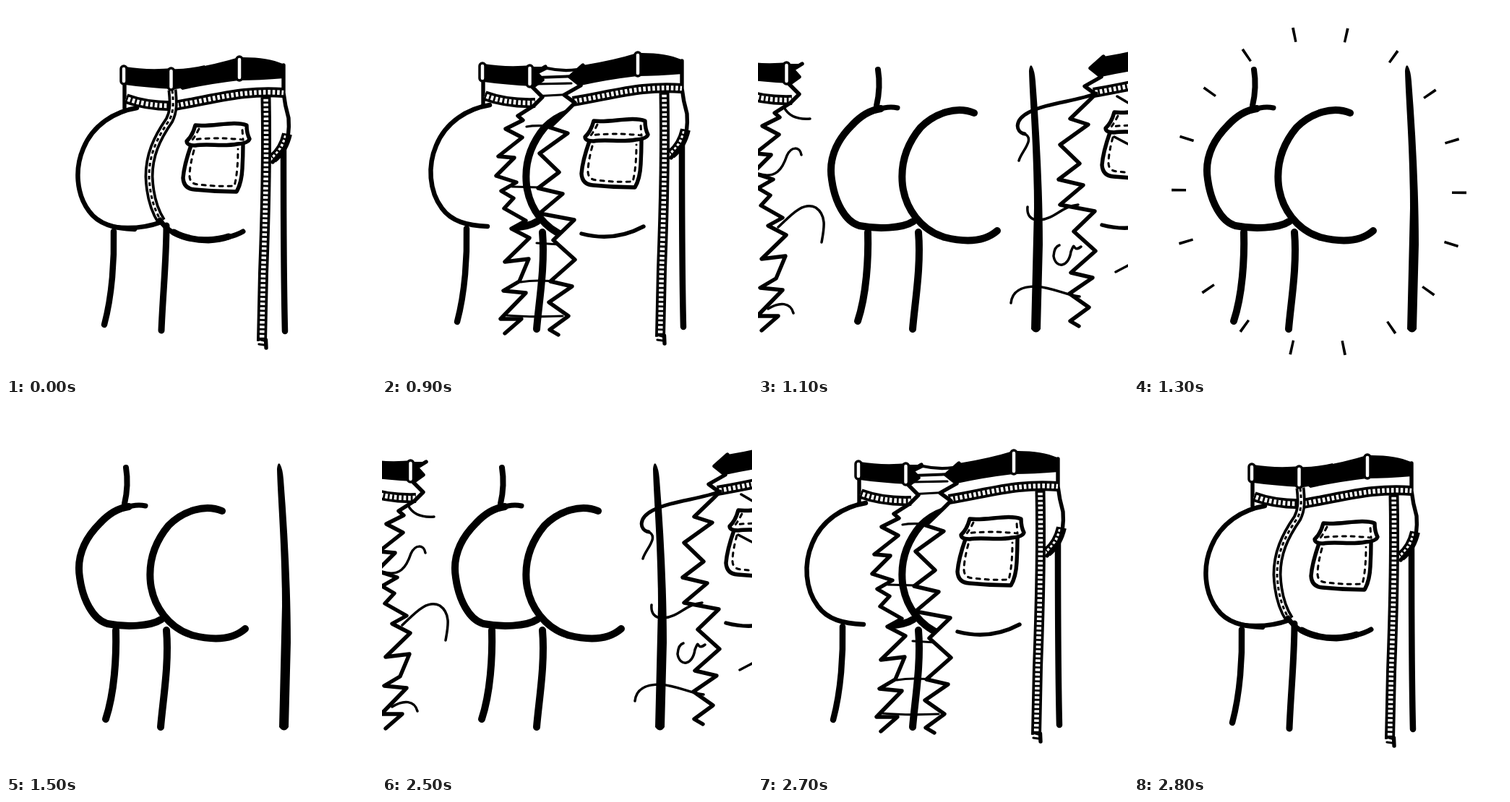
Recreate the animation shown at these times as an HTML page. Size 512 by 512 pixels, loop 2900 ms.

```html
<!DOCTYPE html>
<html lang="en">
<head>
<meta charset="utf-8">
<title>Jeans rip</title>
<style>
html, body { margin: 0; width: 100%; height: 100%; overflow: hidden; background: #fff; }
svg { display: block; width: 100vw; height: 100vh; }
.line { fill: none; stroke: #000; stroke-linecap: round; stroke-linejoin: round; }
.thin { stroke-width: 3.2; }
.mid { stroke-width: 5.4; }
.paper { fill: #fff; }
.loop { fill: #fff; stroke: #000; stroke-width: 3.5; }
.band, .gap, .ticks { fill: none; stroke: #000; stroke-width: 14; }
.gap { stroke: #fff; stroke-width: 6.5; }
.ticks { stroke-width: 8; stroke-dasharray: 2.8 3.6; }
.dash { fill: none; stroke: #000; stroke-width: 3; stroke-linecap: round; stroke-dasharray: 5 7; }

/* one loop: hard steps, 2900 ms */
.step { visibility: hidden; animation: 2900ms step-end infinite; }
#whole { animation-name: whole; }
#body { animation-name: body; }
#left { animation-name: left; }
#right { animation-name: right; }
#near { animation-name: near; }
#mid { animation-name: mid; }
#far { animation-name: far; }
#rays1 { animation-name: rays1; }
#rays2 { animation-name: rays2; }
#rays3 { animation-name: rays3; }
@keyframes whole { 0%, 96.55% { visibility: visible } 31.03% { visibility: hidden } 100% { visibility: visible } }
@keyframes body { 0%, 96.55%, 100% { visibility: hidden } 31.03% { visibility: visible } }
@keyframes left {
  0%, 41.37%, 96.55%, 100% { visibility: hidden; transform: translate(-330px, -10px) }
  31.03%, 93.1% { visibility: visible; transform: translate(-28px, -4px) }
  34.48%, 89.65% { visibility: visible; transform: translate(-91px, -6px) }
  37.93%, 86.2% { visibility: visible; transform: translate(-193px, -8px) }
}
@keyframes right {
  0%, 41.37%, 96.55%, 100% { visibility: hidden; transform: translate(360px, -22px) }
  31.03%, 93.1% { visibility: visible; transform: translate(31px, -6px) }
  34.48%, 89.65% { visibility: visible; transform: translate(111px, -11px) }
  37.93%, 86.2% { visibility: visible; transform: translate(231px, -18px) }
}
@keyframes near { 0%, 34.48%, 96.55%, 100% { visibility: hidden } 31.03%, 93.1% { visibility: visible } }
@keyframes mid { 0%, 37.93%, 93.1%, 100% { visibility: hidden } 34.48%, 89.65% { visibility: visible } }
@keyframes far { 0%, 41.37%, 89.65%, 100% { visibility: hidden } 37.93%, 86.2% { visibility: visible } }
@keyframes rays1 { 0%, 44.82%, 100% { visibility: hidden } 41.37% { visibility: visible } }
@keyframes rays2 { 0%, 48.27%, 100% { visibility: hidden } 44.82% { visibility: visible } }
@keyframes rays3 { 0%, 51.72%, 100% { visibility: hidden } 48.27% { visibility: visible } }
</style>
</head>
<body>
<svg viewBox="0 0 512 512">
  <defs>
    <path id="yokeL" d="M166 128C185 135 205 139 236 138"/>
    <path id="yokeR" d="M233 138C265 133 300 124 330 121Q358 118 384 120"/>
    <path id="side" d="M359.500 126C361 200 359 290 356 370L354 464"/>
    <path id="hip" d="M389 177Q384 199 369 211"/>
    <path id="back" d="M230 116C232 135 232 146 226 158C208 184 198 207 198 236C199 263 206 284 215 298"/>

    <g id="waistL">
      <path class="line mid" d="M164 106L164 142"/>
      <use href="#yokeL" class="band"/><use href="#yokeL" class="gap"/><use href="#yokeL" class="ticks"/>
      <path d="M165 84Q195 89 232 86V115Q195 113 165 109Z"/>
      <rect class="loop" x="159" y="83" width="8" height="25" rx="4"/>
    </g>
    <g id="legL">
      <path class="line" stroke-width="6.500" d="M181 141C150 146 120 165 107 197C95 225 97 260 115 284C128 302 150 308 178 309"/>
      <path class="line" stroke-width="8.500" d="M149 312C150 350 147 400 136 441"/>
    </g>
    <rect id="loopMid" class="loop" x="224.500" y="86" width="8" height="30" rx="4"/>

    <g id="rightPart">
      <path d="M247 88Q290 81 322 71Q360 70 383 80L385 100Q350 103 322 103Q280 108 244 116L229 104Z"/>
      <rect class="loop" x="319" y="70" width="8" height="33" rx="4"/>
      <path class="line" stroke-width="8.500" d="M384 198C384 280 384 370 386 450"/>
      <use href="#hip" class="band"/><use href="#hip" class="gap"/><use href="#hip" class="ticks"/>
      <path class="line mid" d="M384 82V120Q386 138 391 155Q393 180 385 197L369 216"/>
      <use href="#yokeR" class="band"/><use href="#yokeR" class="gap"/><use href="#yokeR" class="ticks"/>
      <use href="#side" class="band"/><use href="#side" class="gap"/><use href="#side" class="ticks"/>
      <path class="line mid" stroke-width="4" d="M359.500 462L360 473"/>
      <path class="line thin" d="M349 461L357 463M350 468L357 469"/>
      <path class="line mid" d="M256 193C250 210 246 225 245 238Q246 253 261 254C280 256 300 257 319 257Q326 245 327 225Q328 208 328 192"/>
      <path class="line mid" d="M262 165C285 168 315 158 333 165Q333 176 337 184Q335 190 320 191C300 195 280 190 262 193Q250 193 250 187Q258 180 262 165Z"/>
      <path class="dash" d="M267 170Q262 180 258 185Q290 181 328 185L327 171M260 200Q254 222 254 236Q255 247 267 247Q290 250 316 249Q321 230 321 198"/>
    </g>

    <path id="tearL" d="M254 88L241 96L250 106L236 116L250 130L238 142L216 156L223 162L199 174L222 186L189 212L211 214L186 239L214 248L193 260L210 270L197 284L227 301L207 312L232 325L198 358L231 354L218 385L196 398L227 401L192 437L221 437L198 457"/>
    <path id="tearR" d="M247 88L229 104L244 116L221 129L236 140L226 150L201 174L226 182L187 210L214 236L185 258L219 266L187 293L235 302L206 330L236 357L202 387L232 394L200 416L227 435L201 454L213 461"/>
  </defs>

  <rect width="512" height="512" fill="#fff"/>

  <g id="body" class="step">
    <g class="line" stroke-width="10">
      <path stroke-width="8" d="M166 88Q170 112 164 138"/>
      <path stroke-width="7" d="M193 141Q180 138 164 144"/>
      <path d="M170 142C155 144 142 152 130 165C105 190 98 215 102 240C106 270 120 298 140 304C165 309 200 308 215 298"/>
      <path d="M299 148C275 138 245 148 225 168C205 192 197 220 200 248C204 280 225 310 258 320C290 328 315 325 331 311"/>
      <path d="M152 313C153 350 150 400 138 436"/>
      <path d="M222 313C226 360 217 410 214 447"/>
    </g>
    <path d="M375 90Q376 80 379 83Q383 90 384 104C390 180 394 260 394 330L391 447Q385 456 378 447L382 280C382 200 376 130 375 90Z"/>
  </g>

  <g id="near" class="step line thin">
    <path stroke-width="4" d="M212 94L228 86Q250 91 270 88M215 99L270 97"/>
    <path d="M212 108L262 107M210 125L265 122M200 167Q220 163 258 170M180 250L217 251M214 328L245 330M192 382Q215 378 247 382M172 428Q205 431 250 429"/>
  </g>
  <g id="mid" class="step line thin">
    <path d="M158 86C220 97 290 96 357 101M162 130C225 133 280 116 350 102M246 121Q252 115 265 116M125 176Q155 163 190 166Q260 171 330 173M114 242C180 234 250 220 303 206M175 232L192 225M110 259C190 270 260 288 328 316M230 279L247 289M132 367C180 371 260 370 324 366M246 376Q258 378 268 371M132 400C180 412 250 402 322 410"/>
  </g>

  <g id="left" class="step">
    <path id="paperL" class="paper"/>
    <use href="#waistL" x="4"/>
    <use href="#legL" x="-4"/>
    <path d="M230 88L254 88L241 96L250 106L236 116L230 116Z"/>
    <use href="#loopMid" x="4"/>
    <use href="#tearL" class="line" stroke-width="5.400"/>
  </g>

  <g id="right" class="step">
    <path id="paperR" class="paper"/>
    <use href="#rightPart"/>
    <path class="line mid" d="M245 321C275 329 305 325 331 311"/>
    <use href="#tearR" class="line" stroke-width="5.400"/>
  </g>

  <g id="far" class="step line" stroke-width="3.500">
    <path d="M36 140Q45 158 72 156M0 232C25 240 34 225 40 207C46 194 58 194 60 206M28 306C45 290 62 270 80 279C96 290 91 310 88 327M14 419C30 409 45 410 49 425"/>
    <path stroke-width="5" d="M468 121C440 132 400 134 375 147C354 158 356 174 369 177"/>
    <path d="M369 177C384 184 364 202 361 214M443 275C420 277 410 295 390 296C376 297 372 288 373 278M447 333C434 343 440 322 433 340C430 362 412 364 409 346Q410 333 417 331M350 411C352 392 368 388 385 388C410 390 425 400 445 402"/>
    <path d="M497 125L514 135M493 181L514 192M495 368L514 358"/>
  </g>

  <g fill="none" stroke="#000">
    <ellipse id="rays1" class="step" cx="256" cy="256.500" rx="188" ry="214" stroke-width="10" pathLength="720" stroke-dasharray="2 38"/>
    <ellipse id="rays2" class="step" cx="256" cy="256.500" rx="194" ry="220" stroke-width="20" pathLength="720" stroke-dasharray="2 38"/>
    <ellipse id="rays3" class="step" cx="256" cy="256.500" rx="203" ry="229.500" stroke-width="18" pathLength="720" stroke-dasharray="2 38"/>
  </g>

  <g id="whole" class="step">
    <use href="#waistL"/>
    <use href="#legL"/>
    <use href="#rightPart"/>
    <path d="M228 87Q250 88 275 82V109L228 116Z"/>
    <path class="line" stroke-width="6.500" d="M150 306Q185 310 215 299"/>
    <path class="line" stroke-width="9" d="M222 304C222 350 217 400 215 449"/>
    <use href="#back" class="band" style="stroke-width:13"/>
    <use href="#back" class="gap" style="stroke-width:5.500"/>
    <use href="#back" class="ticks" style="stroke-width:3;stroke-dasharray:5 4"/>
    <path class="line" stroke-width="7" d="M213 296C226 317 252 324 280 323C300 323 318 318 328 312"/>
    <path class="line" stroke-width="9" d="M232 313Q252 324 280 324Q296 323 308 319"/>
    <use href="#loopMid"/>
  </g>
</svg>
<script>
// close each torn edge into the white cloth behind the piece
const cloth = (side, x) => {
  const edge = document.getElementById('tear' + side).getAttribute('d');
  document.getElementById('paper' + side).setAttribute('d', `${edge}V485H${x}V88Z`);
};
cloth('L', 60);
cloth('R', 420);
</script>
</body>
</html>
```
